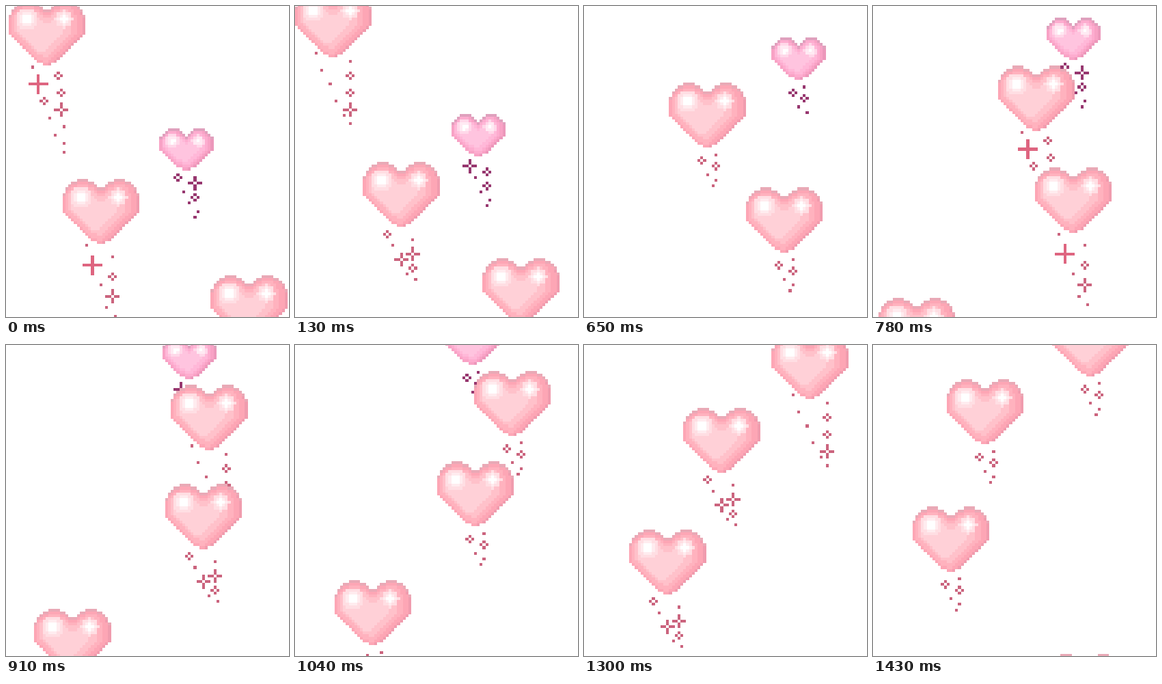
An HTML page with a canvas that plays this animation: 414x455 px, repeating every 1.56 s.

```html
<!DOCTYPE html>
<html lang="en">
<head>
<meta charset="utf-8">
<title>Floating hearts</title>
<style>
html, body { margin: 0; width: 100%; height: 100%; overflow: hidden; background: #fff; }
canvas { display: block; }
</style>
</head>
<body>
<canvas id="stage" width="414" height="455"></canvas>
<script>
const ctx = document.getElementById('stage').getContext('2d');
const STEP = 130, STEPS = 12;
const px = x => Math.round(x * 25 / 6 - 0.6);
const py = y => Math.round(y * 4.14 + 0.5);

function cell(x, y, color) {
  ctx.fillStyle = color;
  ctx.fillRect(px(x), py(y), px(x + 1) - px(x), py(y + 1) - py(y));
}

const BIG = {
  mid: 13, height: 23, top: '#e9a9b6', right: '#f09cae',
  shades: ['#fda6b5', '#ffb2be', '#ffc1ca', '#ffd0d7'],
  glow: ['#ffdee3', '#ffecef', '#ffffff'], spark: '#cb647e', plus: '#de6580'
};
const SMALL = {
  mid: 9, height: 15, top: '#dfa0bd', right: '#ec98bb',
  shades: ['#f8a2c5', '#fdaccf', '#ffb8d8', '#ffc4df'],
  glow: ['#ffd8e9', '#ffeaf3', '#ffffff'], spark: '#97376f', plus: '#97376f'
};

// Two round lobes above, straight sides and a tapered tip below.
function inside({ mid, height }, x, y) {
  const d = Math.abs(x - mid), r = mid / 2 + 0.2, cy = r - 0.4;
  if (y < 0 || y >= height) return false;
  if (y > cy) return d <= Math.min(mid, height + 1 - y, 2 * (height - y) - 1);
  return Math.hypot(d - mid / 2, y - cy) <= r || (y >= 3 && d < mid / 2);
}

function shade(h, x, y) {
  if (!inside(h, x, y - 1)) return h.top;
  let color = inside(h, x + 1, y) ? h.shades[0] : h.right;
  // Each lighter shade lies deeper, most of all from the right.
  for (let i = 1; i < 4; i++) {
    const depth = f => Math.round(f * i * h.mid / 13);
    if (inside(h, x - depth(1), y) && inside(h, x + depth(2.5), y) &&
        inside(h, x, y - depth(1.5)) && inside(h, x, y + depth(1.3))) color = h.shades[i];
  }
  for (const lobe of [0, 1]) {
    const dist = Math.hypot(x / h.mid - lobe - 0.46, y / h.mid - 0.46);
    h.glow.forEach((glow, i) => {
      if (dist <= 0.28 - 0.08 * i - 0.04 * lobe) color = glow;
    });
  }
  return color;
}

for (const h of [BIG, SMALL]) {
  h.cells = [];
  for (let y = 0; y < h.height; y++) {
    for (let x = 0; x <= 2 * h.mid; x++) {
      if (inside(h, x, y)) h.cells.push([x, y, shade(h, x, y)]);
    }
  }
}

// Sparkle size: 0 dot, 1 diamond, 2 hollow plus, 3 solid plus.
function sparkle(size, x, y, h) {
  const color = size === 3 ? h.plus : h.spark;
  if (size % 3 === 0) cell(x, y, color);
  for (let i = 1; i <= size; i++) {
    for (const [dx, dy] of [[-i, 0], [i, 0], [0, -i], [0, i]]) cell(x + dx, y + dy, color);
  }
}

// Trails take turns; each is a zigzag that narrows as it falls behind.
const fading = { sizes: '011000', width: -3, top: 25, gap: 2.2 };
const SHORT = [
  { sizes: '00310200', width: 4.6, top: 23, gap: 3.6 },
  { sizes: '10022100', width: 4.6, top: 24.5, gap: 2.4 },
  fading
];
const LONG = [
  { sizes: '01311200000', width: 4.6, top: 23, gap: 3 },
  { sizes: '0001010200', width: 6, top: 21, gap: 2.8 },
  fading
];
const TINY = [
  { sizes: '1201000', width: 3, top: 17, gap: 2.3 },
  { sizes: '2101000', width: 3, top: 17.5, gap: 2.4 },
  { sizes: '01100', width: -2.5, top: 17, gap: 2.2 }
];

function drawTrail({ sizes, width, top, gap }, x, y, h) {
  [...sizes].forEach((size, i) => {
    const swing = width * (1 - i / sizes.length) * (-1) ** i;
    sparkle(+size, Math.round(x + h.mid - 0.5 + 0.65 * i - swing), Math.round(y + top + gap * i), h);
  });
}

// Key points of each flight: step, x, y.
const flights = [
  { heart: SMALL, trails: () => TINY,
    keys: [[0, 54, 43], [1, 55, 38], [3, 59, 23], [5, 66, 11], [7, 55, -3], [9, 50, -14]] },
  { heart: BIG, trails: () => LONG, keys: [[0, 1, -2], [1, 0, -5], [4, -2, -20]] },
  { heart: BIG, trails: step => step < 6 ? SHORT : LONG,
    keys: [[0, 20, 61], [1, 24, 55], [3, 28, 40], [5, 30, 27], [7, 58, 14], [9, 68, 4], [11, 63, -12]] },
  { heart: BIG, trails: () => SHORT,
    keys: [[0, 72, 95], [1, 66, 89], [3, 61, 80], [5, 57, 64], [7, 56, 49], [9, 43, 32], [11, 26, 12]] },
  { heart: BIG, trails: () => SHORT, keys: [[6, 2, 103], [7, 10, 93], [9, 18, 73], [11, 14, 57]] },
  { heart: BIG, trails: () => SHORT, keys: [[11, 61, 109]] }
];

function place(keys, step) {
  const next = keys.find(k => k[0] >= step);
  const prev = keys.findLast(k => k[0] <= step);
  if (!next || !prev) return null;
  const f = (step - prev[0]) / (next[0] - prev[0] || 1);
  return [1, 2].map(i => Math.round(prev[i] + (next[i] - prev[i]) * f));
}

function draw(time) {
  const step = Math.floor(time / STEP) % STEPS;
  ctx.fillStyle = '#fff';
  ctx.fillRect(0, 0, 414, 455);
  for (const { heart, trails, keys } of flights) {
    const pos = place(keys, step);
    if (!pos) continue;
    const [x, y] = pos;
    drawTrail(trails(step)[step % 3], x, y, heart);
    for (const [cx, cy, color] of heart.cells) cell(x + cx, y + cy, color);
  }
}

let start;
function tick(now) {
  start ??= now;
  draw(now - start);
  requestAnimationFrame(tick);
}
requestAnimationFrame(tick);
</script>
</body>
</html>
```
